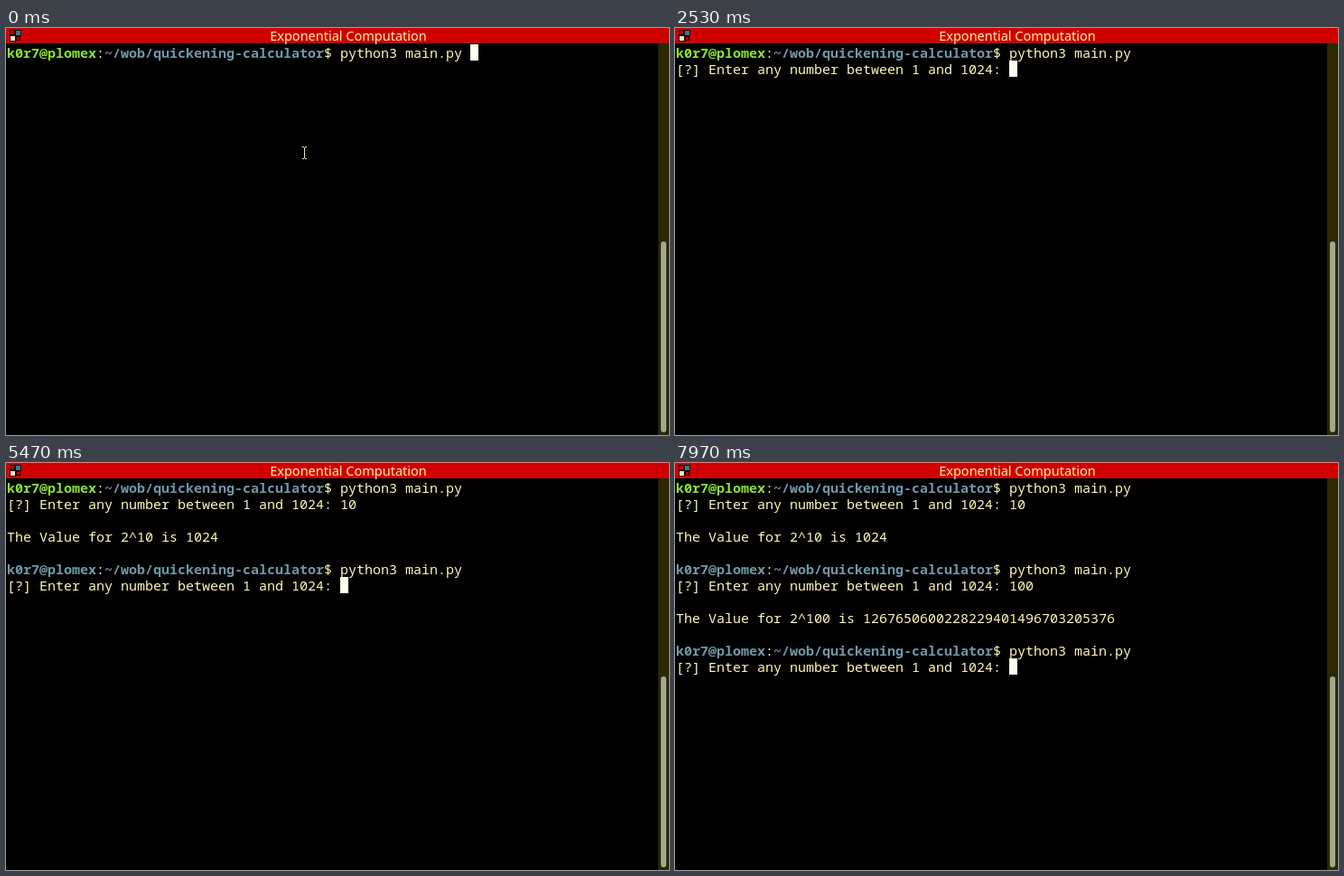
An HTML page for the animation above (8000 ms loop, 734 by 450 pixels).

```html
<!DOCTYPE html>
<html lang="en">
<head>
<meta charset="utf-8">
<title>Terminal</title>
<style>
  html, body { margin: 0; width: 100%; height: 100%; overflow: hidden; background: #000; }
  #stage { position: relative; width: 734px; height: 450px; overflow: hidden; background: #000; }
  #stage > * { position: absolute; margin: 0; }
  #art { left: 0; top: 0; }
  #screen {
    left: 1px; top: 18px; color: #fff8b4; white-space: pre;
    font: 15px/18px "Noto Sans Mono", "DejaVu Sans Mono", monospace;
  }
  #screen b { color: #8ae234; }
  #screen b + b { color: #7098a8; }
  #cursor { width: 9px; height: 18px; background: #fffff0; }
  .title { font: 14.5px "Noto Sans", "Open Sans", sans-serif; fill: #fff0b0; }
</style>
</head>
<body>
<div id="stage">
  <svg id="art" width="734" height="450">
    <rect width="734" height="17" fill="#d00000"/>
    <rect x="24" width="1" height="16" fill="#b40000"/>
    <g shape-rendering="crispEdges">
      <path d="M4 2h6v6h-6zM10 2h7v7h-7zM4 8h7v7h-7zM11 9h5v5h-5z" fill="#200000"/>
      <path d="M5 3h4v4h-4zM12 10h3v3h-3z" fill="#c00000"/>
      <rect x="11" y="3" width="5" height="5" fill="#2a7f9c"/>
      <rect x="5" y="9" width="5" height="5" fill="#e8e4d8"/>
    </g>
    <text class="title" x="379" y="14" text-anchor="middle">Exponential Computation</text>
    <rect x="722" y="17" width="12" height="433" fill="#2c2900"/>
    <rect x="725" y="236" width="6" height="211" rx="3" fill="#a2a792"/>
    <path id="pointer" d="M328 131.5h2m1 0h2M330.5 132v12M328 144.5h2m1 0h2" stroke="#eee89c" fill="none"/>
  </svg>
  <pre id="screen"></pre>
  <div id="cursor"></div>
</div>
<script>
const LOOP = 8000, BLINK = 600, CELL = 9, ROW = 18;
const prompt = "<b>k0r7@plomex</b>:<b>~/wob/quickening-calculator</b>$ ";
const command = "python3 main.py ";
const question = "\n[?] Enter any number between 1 and 1024: ";
const answer = n => `\n\nThe Value for 2^${n} is ${2n ** BigInt(n)}\n\n${prompt}`;

// Each step: time of the key press, text it adds to the screen
const steps = [
  [-170, prompt + command],
  [1100, question],
  [3200, "1"], [3480, "0"],
  [4080, answer(10)],
  [4670, command],
  [5300, question],
  [5750, "1"], [5900, "0"], [6050, "0"],
  [6650, answer(100)],
  [7200, command],
  [7750, question]
];

const [screenEl, cursorEl, pointerEl] =
  ["screen", "cursor", "pointer"].map(id => document.getElementById(id));
let shown = 0;

function draw(now) {
  const t = now % LOOP;
  const done = steps.filter(([time]) => time <= t);
  if (done.length !== shown) {
    shown = done.length;
    screenEl.innerHTML = done.map(step => step[1]).join("");
    const lines = screenEl.textContent.split("\n");
    cursorEl.style.left = 1 + lines.at(-1).length * CELL + "px";
    cursorEl.style.top = ROW * lines.length + "px";
    pointerEl.style.display = shown > 1 ? "none" : "";
  }
  const idle = t - done.at(-1)[0];
  cursorEl.style.visibility = Math.floor(idle / BLINK) % 2 ? "hidden" : "visible";
}

const start = performance.now();
function tick() {
  draw(performance.now() - start);
  requestAnimationFrame(tick);
}
tick();
</script>
</body>
</html>
```
